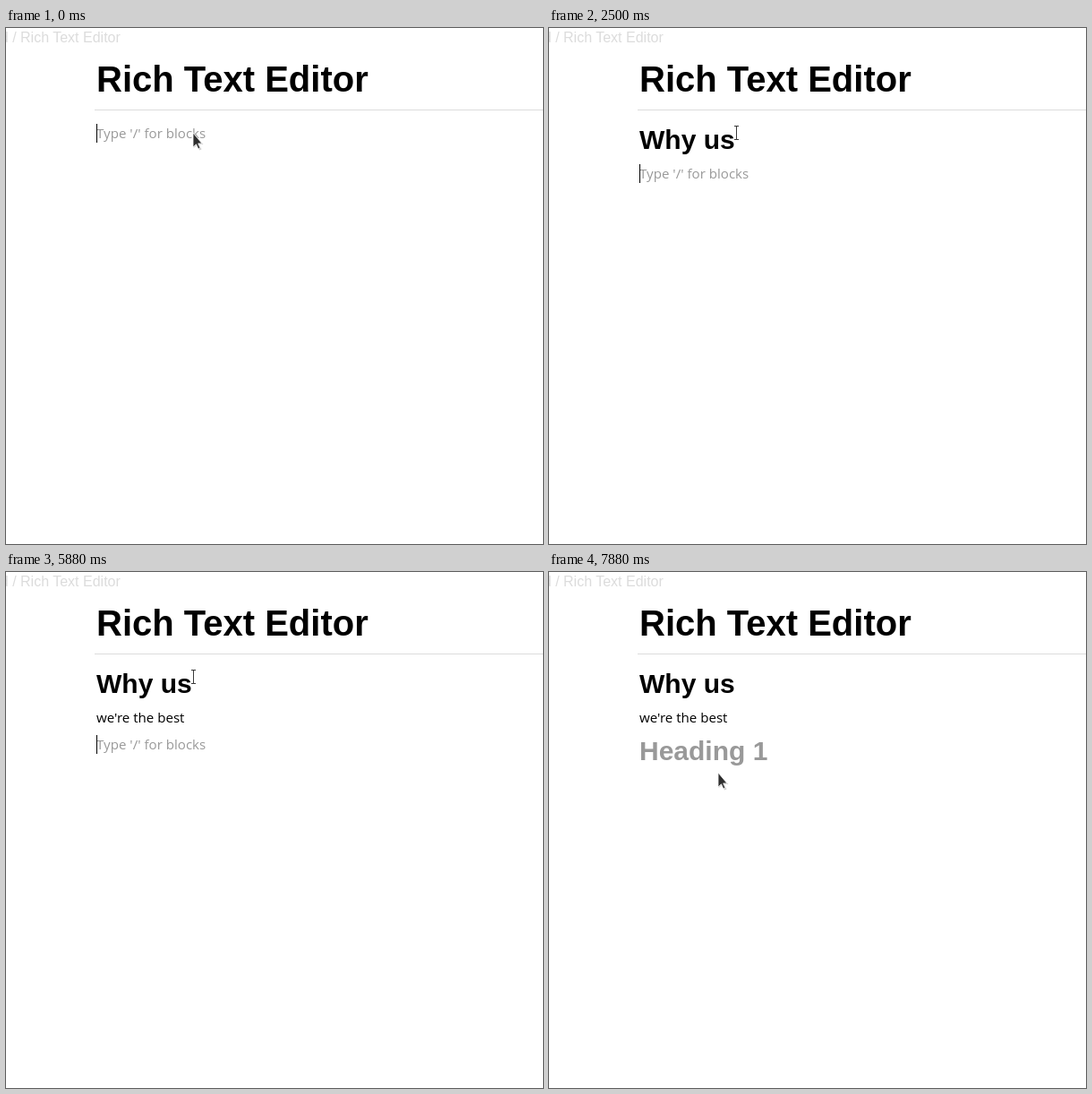
Recreate the animation shown at these times as an HTML page. Size 600 by 576 pixels, loop 8 s.

```html
<!DOCTYPE html>
<html lang="en">
<head>
<meta charset="utf-8">
<title>Block editor</title>
<style>
  html, body { margin: 0; width: 100%; height: 100%; overflow: hidden; background: #fff; }
  svg { position: absolute; left: 0; top: 0; overflow: hidden; }
  text { white-space: pre; font-family: "Open Sans", "Noto Sans", sans-serif; }
  .crumb, .title, .heading { font-family: "Liberation Sans", Arial, sans-serif; }
  .crumb { font-size: 16px; fill: #dcdcdc; }
  .title { font-size: 40px; font-weight: bold; }
  .heading { font-size: 30px; font-weight: bold; }
  .body { font-size: 15.1px; }
  .hint { fill: #999; }
  .label { font-size: 13.5px; stroke: #000; stroke-width: .6px; }
  .small { font-size: 10.43px; fill: #808080; }
  .strong { fill: #444; stroke: #444; stroke-width: .4px; }
  .shortcut { font-size: 11.7px; fill: #7c7c7c; }
  .icon { font-family: "Noto Serif", serif; font-size: 17px; fill: #5c5c5c; stroke: #5c5c5c; stroke-width: .45px; }
  .badge { font-size: 11.3px; fill: #fff; stroke: #fff; stroke-width: .25px; }
  #menu {
    position: absolute; left: 99px; width: 300px; height: 350px;
    background: #fff; border-radius: 3px;
    box-shadow: 0 0 0 1px rgba(15,15,15,.05), 0 3px 6px rgba(15,15,15,.1), 0 9px 24px rgba(15,15,15,.2);
  }
</style>
</head>
<body>
<svg width="600" height="576">
  <text class="crumb" x="-6.2" y="16">d / Rich Text Editor</text>
  <text class="title" x="101" y="71">Rich Text Editor</text>
  <path d="M99 91.5H600" stroke="#dcdcdc"/>
  <text id="line0" x="101"></text>
  <text id="line1" x="101"></text>
  <text id="line2" x="101"></text>
  <rect id="caret" width="1"/>
</svg>

<div id="menu">
  <svg width="300" height="350">
    <text class="label" x="6" y="21">Add blocks</text>
    <text class="small" x="6" y="37">Keep typing then hit enter when done.</text>
    <g id="filter">
      <text class="small strong" x="6" y="52">Filetring keyword</text>
      <rect x="92" y="40" width="12" height="15" rx="2" fill="#2f5dac"/>
      <text class="badge" x="94.8" y="52">1</text>
    </g>
    <g id="item">
      <rect width="300" height="55" fill="#f2f3f5"/>
      <text class="icon" x="19.8" y="28">H<tspan font-size="14">1</tspan></text>
      <path d="M20 33.5h29M20 37.5h25M20 41.5h17" stroke="#c4c4c6"/>
      <text class="label" x="60" y="24">Heading 1</text>
      <text class="shortcut" x="60" y="43">Shortcut: type / + 1</text>
    </g>
  </svg>
</div>

<svg width="600" height="576">
  <g id="arrow">
    <path d="M.5 1V17L4.500 14L7 19.500L9.500 18.500L7.200 13H11.500Z" fill="#000" opacity=".18"/>
    <path d="M0 0V16L3.500 12.800L5.800 18L8 17L5.700 11.900H10Z" fill="#2e2e2e" stroke="#fff" stroke-width=".8"/>
  </g>
  <g id="beam" fill="none">
    <path d="M-2.500 -7.500H2.500M0 -7.500V7.500M-2.500 7.500H2.500" stroke="#fff" stroke-width="3"/>
    <path d="M-2.500 -7.500H2.500M0 -7V7M-2.500 7.500H2.500" stroke="#3a3a3a"/>
  </g>
</svg>

<script>
const LOOP = 8000;
const $ = id => document.getElementById(id);
const lines = [0, 1, 2].map(n => $('line' + n));
const body = (text, y) => ({ text, y, kind: 'body', hint: 'Type \'/\' for blocks' });
const heading = (text, y) => ({ text, y, kind: 'heading', hint: 'Heading 1' });
const first = text => ({ line0: heading(text, 135), caret: 1 });
const second = text => ({ line1: body(text, 168), caret: 1 });
const third = text => ({ line2: body(text, 198), caret: 1 });
const pointer = (shape, x, y) => ({ pointer: { shape, x, y } });

// Each step changes part of the state and holds until the next one.
const steps = [
  [0, { line0: body('', 123), line1: null, line2: null, caret: 1, menu: 0, keyword: 0, ...pointer('arrow', 209, 117) }],
  [250, { caret: 0 }],
  [630, { line0: body('/', 123), caret: 1, ...pointer('beam', 209.5, 117) }],
  [750, { menu: 134 }],
  [1000, { line0: body('/1', 123), keyword: 1 }],
  [1250, { ...first(''), menu: 0, keyword: 0 }],
  ...typed('Why us', [1380, 1500, 1630, 1880, 2000, 2130], first),
  [2500, second('')],
  ...typed('we\'re the best',
    [3130, 3250, 3380, 3500, 3630, 3750, 3880, 4000, 4130, 4250, 4250, 4380, 4500, 4630], second),
  [5250, { caret: 0 }],
  [5630, third('')],
  [6000, third('/')],
  [6250, { menu: 209 }],
  [6630, pointer('beam', 207.5, 136)],
  [6750, { caret: 0, ...pointer('beam', 203.5, 172) }],
  [6880, pointer('arrow', 200, 218)],
  [7000, pointer('arrow', 197, 264)],
  [7130, pointer('arrow', 195, 294)],
  [7250, pointer('arrow', 193, 287)],
  [7380, { line2: heading('', 210), menu: 0 }],
  [7880, pointer('arrow', 189, 224)]
];

function typed(text, times, make) {
  return times.map((time, i) => [time, make(text.slice(0, i + 1))]);
}

const show = (el, on) => { el.style.display = on ? '' : 'none'; };

function drawLine(el, line) {
  el.textContent = line ? line.text || line.hint : '';
  if (!line) return;
  el.setAttribute('y', line.y);
  el.setAttribute('class', line.kind + (line.text ? '' : ' hint'));
}

function drawCaret(line, on) {
  show($('caret'), on);
  if (!on) return;
  const tall = line.kind === 'heading';
  const width = line.text ? lines[line.index].getComputedTextLength() : 0;
  $('caret').setAttribute('x', Math.round(101 + width));
  $('caret').setAttribute('y', line.y - (tall ? 27 : 16));
  $('caret').setAttribute('height', tall ? 34 : 21);
}

function draw(state) {
  let active;
  lines.forEach((el, index) => {
    const line = state['line' + index];
    drawLine(el, line);
    if (line) active = { ...line, index };
  });
  drawCaret(active, state.caret);

  show($('menu'), state.menu);
  $('menu').style.top = state.menu + 'px';
  show($('filter'), state.keyword);
  $('item').setAttribute('transform', `translate(0 ${state.keyword ? 63 : 48})`);

  const { shape, x, y } = state.pointer;
  for (const id of ['arrow', 'beam']) {
    show($(id), id === shape);
    $(id).setAttribute('transform', `translate(${x} ${y})`);
  }
}

const start = performance.now();
let shown = -1;

function tick() {
  const time = (performance.now() - start) % LOOP;
  const count = steps.filter(([at]) => at <= time).length;
  if (count !== shown) {
    draw(Object.assign({}, ...steps.slice(0, count).map(step => step[1])));
    shown = count;
  }
  requestAnimationFrame(tick);
}
tick();
</script>
</body>
</html>
```
